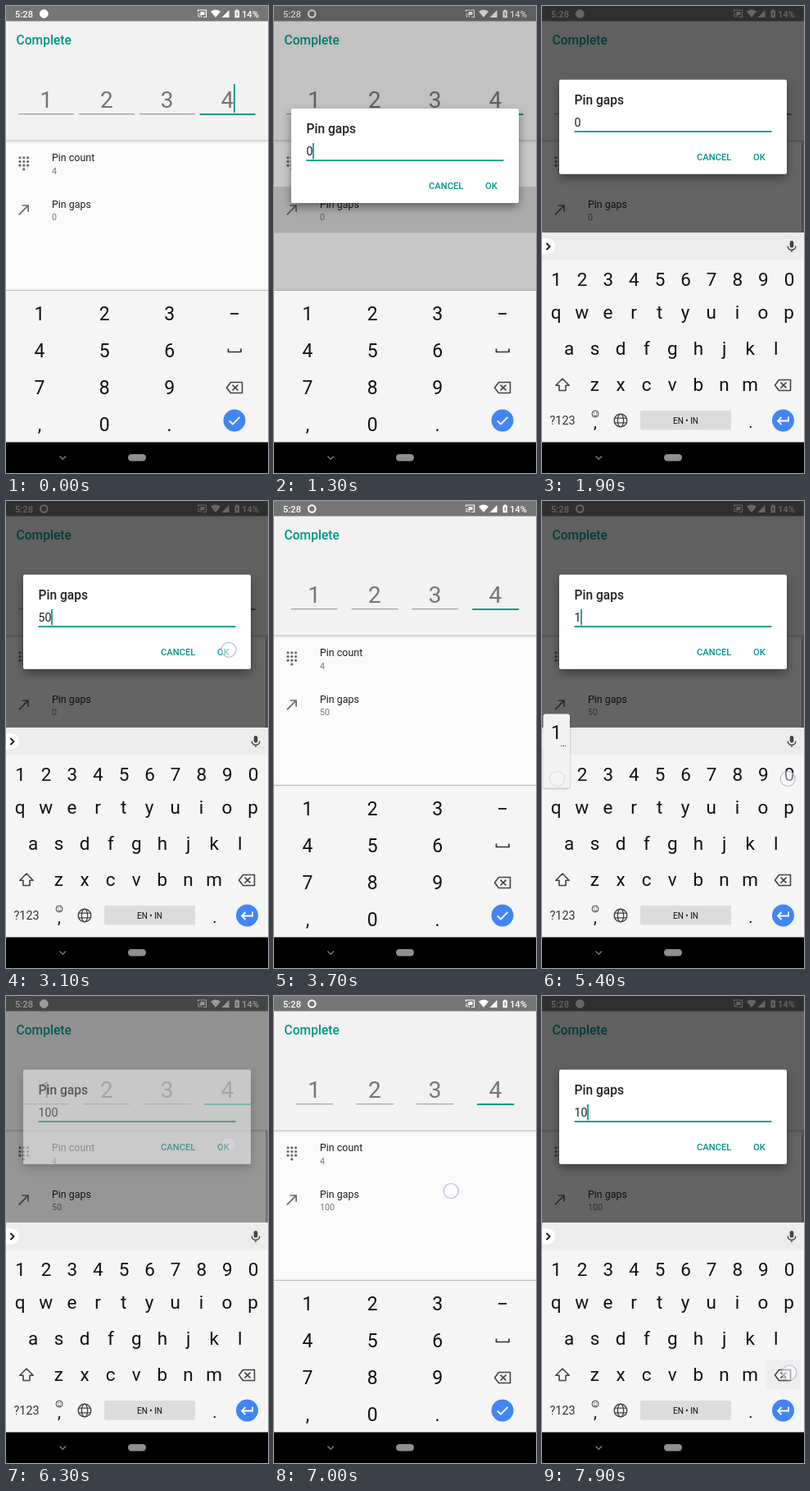
Write an HTML page that moves like this. It is 320 by 569 pixels and loops after 8000 ms.

```html
<!DOCTYPE html>
<html lang="en">
<head>
<meta charset="utf-8">
<title>Pin settings</title>
<style>
html, body { margin: 0; height: 100%; overflow: hidden; background: #000; }
svg { display: block; width: 100%; height: 100%; font-family: Roboto, sans-serif; }
</style>
</head>
<body>
<svg id="stage" viewBox="0 0 320 569"></svg>
<script>
const TEAL = '#009688', INK = '#111', BLUE = '#4285f4', LOOP = 8000;

const text = (x, y, size, str, fill = INK, extra = '') =>
  `<text x="${x}" y="${y}" font-size="${size}" fill="${fill}" ${extra}>${str}</text>`;
const mid = (x, y, size, str, fill = INK, extra = '') =>
  text(x, y, size, str, fill, 'text-anchor="middle" ' + extra);
const rect = (x, y, w, h, fill, extra = '') =>
  `<rect x="${x}" y="${y}" width="${w}" height="${h}" fill="${fill}" ${extra}/>`;
const circle = (x, y, r, fill, extra = '') =>
  `<circle cx="${x}" cy="${y}" r="${r}" fill="${fill}" ${extra}/>`;
const line = (d, color, width, extra = '') =>
  `<path d="${d}" fill="none" stroke="${color}" stroke-width="${width}" ${extra}/>`;
const shape = (d, fill, extra = '') => `<path d="${d}" fill="${fill}" ${extra}/>`;
const group = (id, body, extra = '') => `<g id="${id}" ${extra}>${body}</g>`;
const medium = 'font-weight="500"';

const backspace = (x, y) => `<g transform="translate(${x} ${y})">` +
  line('M-9.5 0L-4.5 -6.5H9.5V6.5H-4.5Z', '#444', 1.6, 'stroke-linejoin="round"') +
  line('M-2.5 -3.3L4.5 3.3M4.5 -3.3L-2.5 3.3', '#444', 1.6) + '</g>';

function statusBar() {
  return rect(0, 0, 320, 18.5, '#757575') +
    text(11, 13.6, 11.2, '5:28', '#fff', medium) +
    '<circle id="rec" cx="46.3" cy="9.5" stroke="#fff"/>' +
    line('M234.5 7V5H244.5V13.5H241', '#fff', 1.2) +
    line('M234 9.2a4.6 4.6 0 0 1 4.6 4.6M234 11.6a2.2 2.2 0 0 1 2.2 2.2', '#fff', 1.1) +
    rect(237.5, 7, 5, 4, '#fff') +
    shape('M250 6.8Q256 2.4 262 6.8L256 14Z', '#fff') +
    shape('M263.5 14H272.5V5Z', '#fff') +
    shape('M279.5 5.6H281V4.4H283.4V5.6H285V14.2H279.5Z', '#fff') +
    line('M282.8 7L281.4 9.8H283.2L281.8 12.4', '#757575', .9) +
    text(288, 13.6, 11.2, '14%', '#fff', medium);
}

function page() {
  let s = rect(0, 18, 320, 328, '#fafafa') + rect(0, 18, 320, 145.5, '#f2f2f2') +
    rect(0, 163, 320, 2, '#d6d6d6') + rect(0, 165, 320, 1.5, '#ececec') +
    rect(0, 344.5, 320, 2, '#f0f0f0') + statusBar() +
    text(12.5, 46.5, 15.6, 'Complete', TEAL, medium);
  for (let i = 0; i < 4; i++) s += mid(49 + 73.8 * i, 123.5, 28, i + 1, '#757575');
  s += line('', '#8c8c8c', 1, 'id="lines"') + line('', TEAL, 2, 'id="activeLine"') +
    rect(278, 95, 1.8, 35, TEAL, 'id="pinCursor"') +
    rect(0, 220, 320, 56.5, '#000', 'id="rowPress" opacity=".15"');
  for (let r = 0; r < 3; r++)
    for (let c = 0; c < 3; c++) s += circle(17 + 4.8 * c, 184.8 + 4.7 * r, 1.6, '#6b6b6b');
  s += circle(21.8, 198.9, 1.6, '#6b6b6b') +
    shape('M9 5v2h6.59L4 18.59 5.41 20 17 8.41V15h2V5z', '#6b6b6b',
      'transform="translate(11.8 237.9) scale(.85)"') +
    text(56, 189.3, 12.44, 'Pin count', '#212121') + text(56, 205, 10.7, '4', '#757575') +
    text(56, 246, 12.44, 'Pin gaps', '#212121') + text(56, 261, 10.7, '', '#757575', 'id="gapValue"') +
    rect(317, 165, 3, 111, '#000', 'id="scrollbar" opacity=".22"');
  return s;
}

function numberPad() {
  let s = rect(0, 346.5, 320, 185.5, '#f5f5f5');
  for (let i = 0; i < 9; i++)
    s += mid(41 + 79.3 * (i % 3), 383 + 45 * Math.floor(i / 3), 23, i + 1);
  return s + mid(41, 518, 23, ',') + mid(120.3, 518, 23, '0') + mid(199.5, 518, 23, '.') +
    rect(274, 374, 10, 1.8, INK) + line('M271.5 417.5V421.5H287V417.5', '#333', 1.7) +
    backspace(279, 465) + circle(279, 505, 13.5, BLUE) +
    line('M272.8 505.3L277 509.5L285.5 500.8', '#fff', 1.9);
}

function fullKeyboard() {
  const row = (chars, x, y) => [...chars].map((c, i) => mid(x + 31.6 * i, y, 22.5, c)).join('');
  return rect(0, 276, 320, 256, '#f5f5f5') + rect(0, 276, 320, 33.5, '#ececec') +
    shape('M0 283H6A9.8 9.8 0 0 1 6 302.6H0Z', '#fff') +
    line('M5.5 289L9.5 293L5.5 297', INK, 1.8) +
    rect(302.7, 286, 4.6, 8.6, '#444', 'rx="2.3"') +
    line('M300.2 292.5a4.8 4.8 0 0 0 9.6 0M305 297.3V300', '#444', 1.4) +
    row('1234567890', 17.6, 341) + row('qwertyuiop', 17.2, 381) +
    row('asdfghjkl', 33, 425) + row('zxcvbnm', 64.4, 468.5) +
    line('M25 454L33.2 462.2H29V468.5H21V462.2H16.8Z', '#444', 1.6, 'stroke-linejoin="round"') +
    rect(273.5, 443, 42.5, 37, '#eee', 'id="delPress" rx="2"') + backspace(294, 462) +
    text(9.5, 509.5, 14.4, '?123', '#333') +
    circle(65, 497, 4, 'none', 'stroke="#444"') + line('M62.8 498.2q2.2 2.6 4.4 0', '#444', .9) +
    circle(63.5, 495.8, .7, '#444') + circle(66.5, 495.8, .7, '#444') + mid(65, 514, 20, ',') +
    circle(96, 505, 7.8, 'none', 'stroke="#444" stroke-width="1.4"') +
    '<ellipse cx="96" cy="505" rx="3.6" ry="7.8" fill="none" stroke="#444" stroke-width="1.3"/>' +
    line('M89 502.2H103M89 507.8H103', '#444', 1.3) +
    rect(120, 493, 111, 23.5, '#dcdcdc', 'rx="2"') + mid(175.5, 508.5, 10, 'EN • IN') +
    mid(255, 513.5, 20, '.') + circle(294.5, 505, 13.5, BLUE) +
    line('M301 500.5V505.5H288.5M292.5 501L288 505.5L292.5 510', '#fff', 1.8);
}

function dialog() {
  return rect(21, 0, 278, 115, '#fff', 'rx="2" filter="url(#shadow)"') +
    text(39.5, 30.3, 15.6, 'Pin gaps', '#212121', medium) +
    text(39.5, 57.3, 14.2, '', '#212121', 'id="entry"') +
    rect(39.5, 62.3, 241, 1.8, TEAL) + rect(0, 42, 1.7, 19.5, TEAL, 'id="entryCursor"') +
    text(189, 98, 11.2, 'CANCEL', TEAL, medium) + text(258, 98, 11.2, 'OK', TEAL, medium);
}

const popup = rect(-16, 259.5, 32.5, 90, '#f2f2f2', 'rx="3" filter="url(#soft)"') +
  mid(0, 290, 23, '', INK, 'id="popupKey"') + mid(8.5, 298.5, 11, '…');

const stage = document.getElementById('stage');
stage.innerHTML =
  `<defs>
    <filter id="shadow" x="-20%" y="-20%" width="140%" height="150%">
      <feDropShadow dx="0" dy="5" stdDeviation="6" flood-opacity=".4"/></filter>
    <filter id="soft" x="-30%" y="-20%" width="160%" height="140%">
      <feDropShadow dx="0" dy="1" stdDeviation="1.2" flood-opacity=".35"/></filter>
  </defs>` +
  page() + rect(0, 0, 320, 569, '#000', 'id="scrim"') + group('dialog', dialog()) +
  group('pad', numberPad()) + group('full', fullKeyboard()) + group('popup', popup) +
  rect(0, 531.5, 320, 38, '#000') +
  line('M65.5 548.5L69.3 552.2L73.1 548.5', '#8a8a8a', 1.2) +
  rect(149, 546, 22, 8.5, '#8f8f8f', 'rx="4.2"') + group('touches', '');

const el = {};
stage.querySelectorAll('[id]').forEach(node => el[node.id] = node);
const set = (node, attrs) => { for (const k in attrs) node.setAttribute(k, attrs[k]); };
const show = (node, on) => set(node, { visibility: on ? 'visible' : 'hidden' });

// Each session opens the dialog, presses keys and confirms with OK.
const sessions = [
  { open: 800, close: 3000, value: '0', keys: [[2100, '<'], [2300, '5'], [2600, '0']] },
  { open: 3900, close: 6100, value: '50',
    keys: [[4800, '<'], [5000, '<'], [5200, '1'], [5400, '0'], [5600, '0']] },
  { open: 6800, close: Infinity, value: '100', keys: [[7800, '<']] },
];
const keyX = key => 18.5 + 31.3 * ((+key + 9) % 10);
const spot = key => key === '<' ? [302, 459] : [keyX(key), 338.5];

const taps = sessions.flatMap(s => [
  [s.open + 100, 216.3, 237.5], [s.close, 272, 181.3],
  ...s.keys.map(([at, key]) => [at, ...spot(key)]),
]);

function entryAt(session, t) {
  let value = session.value, since = session.open + 400;
  for (const [at, key] of session.keys) {
    const done = at + (key === '<' ? 100 : 200);
    if (t < done) break;
    value = key === '<' ? value.slice(0, -1) : value + key;
    since = done;
  }
  return { value, since };
}

const ramp = (t, from, to) => Math.min(1, Math.max(0, (t - from) / (to - from)));
const within = (t, from, to) => t >= from && t < to;

function render(t) {
  const session = sessions.find(s => t < s.close + 700) || sessions[2];
  const a = t - session.open, b = t - session.close;
  const saved = b >= 300 ? entryAt(session, t).value : session.value;
  const { value, since } = entryAt(session, t);

  const solid = Math.floor((t + 100) / 1000) % 2 === 0;
  set(el.rec, { r: solid ? 5 : 4.3, fill: solid ? '#fff' : 'none', 'stroke-width': solid ? .8 : 2 });

  const half = 34 - .113 * saved;
  const underline = (i, y) => `M${49.2 + 73.8 * i - half} ${y}h${2 * half}`;
  set(el.lines, { d: [0, 1, 2].map(i => underline(i, 131.7)).join('') });
  set(el.activeLine, { d: underline(3, 132) });
  el.gapValue.textContent = saved;
  show(el.pinCursor, t < 300 || within(t, 800, 1200) || within(b, 300, 700));
  show(el.rowPress, within(a, 300, 600));

  const typing = a >= 600 && b < 300;
  show(el.full, typing);
  show(el.pad, !typing);
  show(el.scrollbar, typing);

  const scrim = a < 500 ? .1 * ramp(a, 300, 400) : .2 + .4 * ramp(a, 500, 700);
  set(el.scrim, { opacity: scrim + (scrim > .1 ? .1 * 0 : 0) - scrim * ramp(b, 100, 400) });
  set(el.dialog, {
    opacity: ramp(a, 300, 500) * (1 - ramp(b, 100, 300)),
    transform: `translate(0 ${125 - 35.2 * ramp(a, 500, 700)})`,
  });
  el.entry.textContent = value;
  set(el.entryCursor, { x: 39.2 + 7.98 * value.length });
  el.entryCursor.style.display = Math.floor((t - since) / 500) % 2 ? 'none' : '';

  const held = session.keys.find(([at, key]) => key !== '<' && within(t, at + 100, at + 300));
  show(el.popup, held);
  if (held) {
    set(el.popup, { transform: `translate(${Math.min(keyX(held[1]) - 1, 303)} 0)` });
    el.popupKey.textContent = held[1];
  }
  el.delPress.style.display =
    session.keys.some(([at, key]) => key === '<' && within(t, at + 100, at + 200)) ? '' : 'none';

  el.touches.innerHTML = taps.filter(([at]) => within(t, at, at + 300)).map(([at, x, y]) =>
    circle(x, y, 9, '#fff', `fill-opacity=".5" stroke="#b4b9d8" stroke-width="1.2" opacity="${t < at + 200 ? 1 : .35}"`)
  ).join('');
}

const start = performance.now();
function tick() {
  const t = (performance.now() - start) % LOOP;
  render(Math.floor(t / 100) * 100);
  requestAnimationFrame(tick);
}
tick();
</script>
</body>
</html>
```
